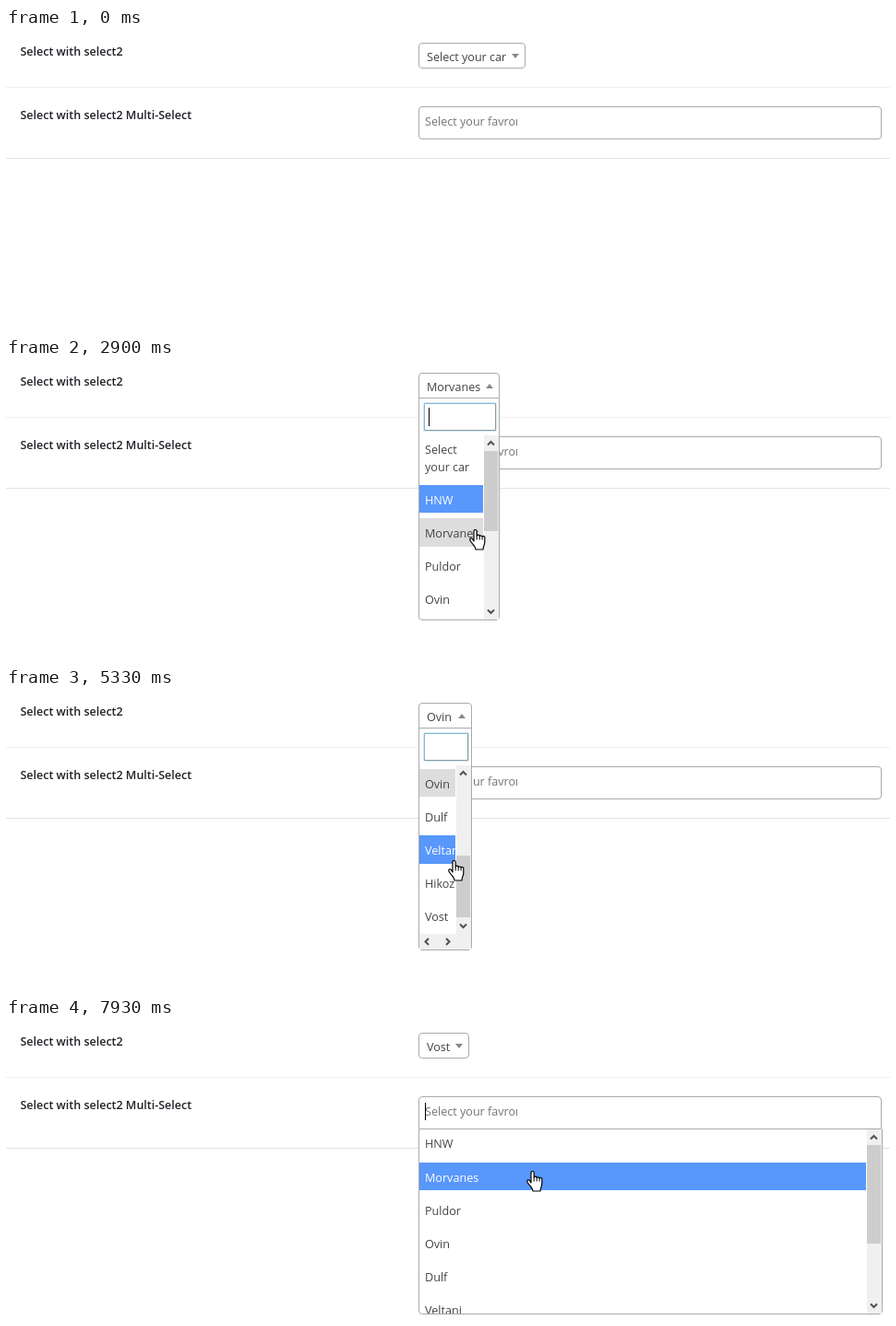
An HTML page for the animation above (8000 ms loop, 958 by 328 pixels).

```html
<!DOCTYPE html>
<html lang="en">
<head>
<meta charset="utf-8">
<title>Select fields</title>
<style>
  html, body { margin: 0; width: 100%; height: 100%; overflow: hidden; background: #fff; }
  svg { display: block; }
  #stage { width: 100vw; height: 100vh; }
  text { font: 12.6px "Open Sans", "Noto Sans", sans-serif; fill: #444; white-space: pre; }
  .title { font-size: 12.5px; font-weight: 600; fill: #1d2025; }
  .hint { fill: #757575; }
  .on { fill: #fff; }
</style>
</head>
<body>
<svg id="stage" viewBox="0 0 958 328"></svg>
<script>
const LOOP = 8000;
const LEFT = 447, LIST_TOP = 84, MULTI_TOP = 121;
const BORDER = '#aaa', BLUE = '#5897fb', GREY = '#ddd', TRACK = '#f0f0f0';
const ITEM = 30.4, STEP = 36.2, LINE = 18.2;
const MAX_SCROLL = 177.1, HOVER_LAG = 60;
const CARS = ['Select your car', 'HNW', 'Morvanes', 'Puldor', 'Ovin', 'Dulf', 'Veltani', 'Hikozu', 'Vost'];

// Each visit to the single list ends with a pick that resizes the field.
const PICKS = [
  { open: 1030, close: 1770, item: 2, width: 88 },
  { open: 2530, close: 3900, item: 4, width: 58 },
  { open: 4570, close: 5930, item: 8, width: 55 }
];
const FOCUS_LOST = 6470, MULTI_OPEN = 6830, MULTI_BLUR = 7930;

// Pointer moves: start, end, target x, target y.
const ENTRY = [440, 330];
const MOVES = [
  [500, 830, 509, 38],
  [1170, 1570, 513, 197],
  [1770, 2030, 530, 72],
  [2030, 2400, 519, 37],
  [2670, 3370, 506, 250],
  [3900, 4400, 484, 20],
  [4600, 5330, 487, 187],
  [5400, 5730, 485, 247],
  [5930, 6470, 590, 89],
  [6700, 6800, 590, 102],
  [7330, 7430, 575, 149],
  [7630, 7730, 572, 166]
];
const POINTERS = {
  arrow: '<path d="M.5.5V17L4.3 13.4 7 19.3 9.3 18.3 6.7 12.5H12Z" fill="#fff" stroke="#000"/>',
  hand: `<g transform="translate(-8 -.5)" stroke="#000" stroke-linejoin="round">
    <path fill="#fff" stroke-width="1.2" d="M5 13.5V2.6a1.6 1.6 0 0 1 3.2 0V8a1.5 1.5 0 0 1 3 .4 1.5 1.5 0 0 1 2.9.6 1.4 1.4 0 0 1 2.7.8V14.5c0 3-1.7 4-1.7 8H7C7 19 3 16.5 1 12.7c-1-2 1-3 2.3-2Z"/>
    <path fill="none" d="M8.2 8v4M11.2 8.6V12M14.1 9.2V12"/></g>`,
  beam: '<path d="M-3-7.5H-.5L0-7 .5-7.5H3M-3 7.5H-.5L0 7 .5 7.5H3M0-7V7" fill="none" stroke="#000" stroke-width="1.3"/>'
};

const rect = (x, y, w, h, fill, more = '') =>
  `<rect x="${x}" y="${y}" width="${w}" height="${h}" fill="${fill}" ${more}/>`;
const text = (x, y, value, cls = '') => `<text x="${x}" y="${y}" class="${cls}">${value}</text>`;
const clip = (x, y, w, h, inner) =>
  `<svg x="${x}" y="${y}" width="${w}" height="${h}" overflow="hidden">${inner}</svg>`;
const path = (d, stroke, fill = 'none', width = 1) =>
  `<path d="${d}" stroke="${stroke}" fill="${fill}" stroke-width="${width}"/>`;
const chevron = (x, y, turn) =>
  `<g transform="translate(${x} ${y}) rotate(${turn})">${path('M-3.5 2 0-1.5 3.5 2', '#505050', 'none', 2)}</g>`;
const ramp = (t, from, to) => Math.min(1, Math.max(0, (t - from) / (to - from)));
const easeOut = k => 1 - (1 - k) ** 3;
const blinkOn = (t, start) => Math.floor((t - start) / 500) % 2 === 0;

function pointerAt(t) {
  let [x, y] = ENTRY;
  for (const [start, end, toX, toY] of MOVES) {
    const k = easeOut(ramp(t, start, end));
    x += (toX - x) * k;
    y += (toY - y) * k;
  }
  return [Math.round(x), Math.round(y)];
}

function layout(first, promptLines, scroll) {
  let y = -.4 - scroll;
  return CARS.slice(first).map((name, n) => {
    const lines = first + n ? [name] : promptLines;
    const extra = (lines.length - 1) * LINE;
    const item = { index: first + n, lines, y, end: y + ITEM + extra };
    y += STEP + extra;
    return item;
  });
}

// The option under the pointer is lit; the fallback is lit until one is reached.
function hovered(t, items, top, fallback) {
  const y = pointerAt(t - HOVER_LAG)[1] - top;
  const item = y < 0 ? null : items.filter(it => it.y <= y).pop();
  return item ? item.index : fallback;
}

function options(items, width, lit, chosen) {
  return items.map(({ index, lines, y, end }) => {
    const fill = index === lit ? BLUE : index === chosen ? GREY : 'none';
    const top = Math.round(y);
    return rect(0, top, width, Math.round(end) - top, fill) + lines.map((line, n) =>
      text(6, Math.round(y + 20.85 + n * LINE), line, index === lit ? 'on' : '')).join('');
  }).join('');
}

function scrollbar(x, top, bottom, thumbTop, thumbHeight) {
  return rect(x, top, 16, bottom - top, TRACK) +
    rect(x, thumbTop, 15, thumbHeight, '#cdcdcd') +
    chevron(x + 7.5, top + 8.5, 0) + chevron(x + 7.5, bottom - 8.5, 180);
}

function multiField(t) {
  const open = t >= MULTI_OPEN;
  const edge = open && t < MULTI_BLUR ? '#000' : BORDER;
  const field = (open
    ? path('M447.5 120.5V89a3.5 3.5 0 0 1 3.5-3.5H945a3.5 3.5 0 0 1 3.5 3.5V120.5Z', edge, '#fff')
    : rect(447.5, 85.5, 501, 35, '#fff', `rx="3.5" stroke="${edge}"`)) +
    clip(454, 86, 100, 34, text(0, 20, 'Select your favrorite', 'hint'));
  if (!open) return field;
  const items = layout(1, [], 0);
  return field +
    (blinkOn(t, MULTI_OPEN) ? rect(454, 92, 1, 19, '#000') : '') +
    path('M447.5 121V318a3.5 3.5 0 0 0 3.5 3.5H946a3.5 3.5 0 0 0 3.5-3.5V121', BORDER, '#fff') +
    clip(448, MULTI_TOP, 484, 200, options(items, 484, hovered(t, items, MULTI_TOP, 1))) +
    scrollbar(933, MULTI_TOP, 321, 138, 107);
}

function dropdown(t, start, width, chosen) {
  const right = LEFT + width, listWidth = width - 19;
  const narrow = width < 60;
  const scroll = narrow ? ramp(t, 4950, 5250) : 0;
  const bottom = narrow ? 267 : 284;
  const prompt = narrow ? ['Select', 'your', 'car']
    : width > 100 ? ['Select your', 'car'] : ['Select', 'your car'];
  const items = layout(0, prompt, scroll * MAX_SCROLL);
  const x = 453.5, end = right - 4.5;
  return rect(LEFT + .5, 16.5, width - 1, 268, '#fff', `rx="3.5" stroke="${BORDER}"`) +
    rect(LEFT, 43, width, 1, BORDER) +
    rect(x - 1, 48.5, end - x + 2, 31, 'none', 'rx="1" stroke="#1e8cbe" stroke-opacity=".2"') +
    path(`M${x} 78.5V49.5H${end}`, '#86b5d0', '#fff') +
    path(`M${x} 78.5H${end}V49.5`, '#8c9aa2') +
    (blinkOn(t, start) ? rect(458, 54, 1, 20, '#000') : '') +
    clip(448, LIST_TOP, listWidth, bottom - LIST_TOP,
      options(items, listWidth, hovered(t, items, LIST_TOP, chosen), chosen)) +
    scrollbar(right - 17, LIST_TOP, bottom, 101 + scroll * 81, narrow ? 67 : 87) +
    (narrow ? rect(448, 267, width - 2, 17, TRACK) +
      chevron(456, 275.5, -90) + chevron(479, 275.5, 90) : '');
}

function singleField(t, { item, width, close }, visit) {
  const tip = LEFT + width - 11;
  const [base, point] = visit ? [33, 28] : [28, 33];
  const focused = !visit && item && t < FOCUS_LOST;
  return (visit
    ? dropdown(t, visit.open, width, item)
    : rect(LEFT + .5, 16.5, width - 1, 27, '#fff', `rx="3.5" stroke="${BORDER}"`)) +
    text(456, 36, CARS[item]) +
    path(`M${tip - 4} ${base}H${tip + 4}L${tip} ${point}Z`, 'none', '#888') +
    (focused ? rect(446.5, 15.5, width + 1, 29, 'none', 'stroke="#000" stroke-dasharray="1 1"') : '');
}

function pointerKind(t, x, y, right, visit) {
  const inside = x >= LEFT && x < right;
  if (inside && y >= 16 && y < 44) return 'hand';
  if (visit && inside && y < 285) {
    if (y >= 49 && y < 80) return 'beam';
    return y >= LIST_TOP && x < right - 17 ? 'hand' : 'arrow';
  }
  if (x >= LEFT && y >= 85 && y < MULTI_TOP) return 'beam';
  return t >= MULTI_OPEN && y >= MULTI_TOP ? 'hand' : 'arrow';
}

function scene(t) {
  const visit = PICKS.find(pick => t >= pick.open && t < pick.close);
  const value = PICKS.filter(pick => t >= pick.close).pop() || { item: 0, width: 116 };
  const [x, y] = pointerAt(t);
  const kind = pointerKind(t, x, y, LEFT + value.width, visit);
  return rect(0, 64, 958, 1, '#eee') + rect(0, 141, 958, 1, '#e3e3e3') +
    text(15.5, 30, 'Select with select2', 'title') +
    text(15.5, 99, 'Select with select2 Multi-Select', 'title') +
    multiField(t) + singleField(t, value, visit) +
    `<g transform="translate(${x} ${y})">${POINTERS[kind]}</g>`;
}

const stage = document.getElementById('stage');
const begin = performance.now();
function draw() {
  stage.innerHTML = scene((performance.now() - begin) % LOOP);
  requestAnimationFrame(draw);
}
draw();
</script>
</body>
</html>
```
